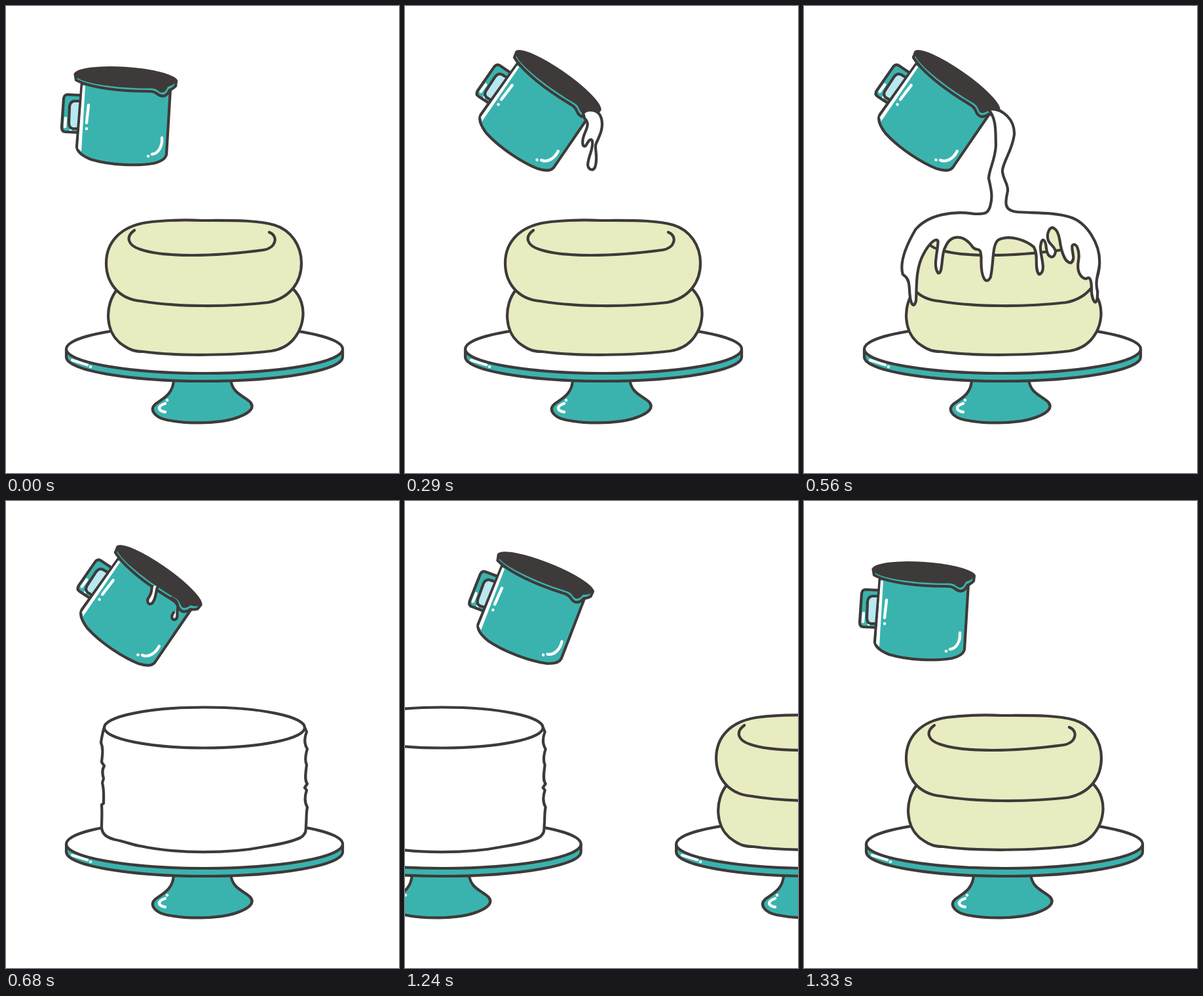
An HTML page for the animation above (1360 ms loop, 600x712 px).

```html
<!DOCTYPE html>
<html lang="en">
<head>
<meta charset="utf-8">
<title>Icing a cake</title>
<style>
  html, body { margin: 0; width: 100%; height: 100%; overflow: hidden; background: #fff; }
  svg { display: block; width: 100vw; height: 100vh; }
  svg * { stroke-linecap: round; stroke-linejoin: round; }
  .line { stroke: #3e3a39; stroke-width: 4.2; fill: none; }
  .teal { fill: #3ab3ae; }
  .cream { fill: #e9ebc1; }
  .white { fill: #fff; }
  .sky { fill: #b8e8f2; }
  .dark { fill: #3e3a39; }
  .shine { stroke: #fff; stroke-width: 4.4; fill: none; }
</style>
</head>
<body>
<svg viewBox="0 0 600 712">
  <defs>
    <g id="stand">
      <path class="line teal" d="M256 570C255 592 240 598 228 607C217 617 230 628 245 631C280 638 330 637 357 626C372 620 381 612 372 603C360 593 346 590 343 570"/>
      <path class="shine" d="M243 606C231 610 231 617 243 619M246 601h.1"/>
      <path class="line teal" d="M92 523V535A211 37 0 0 0 514 535V523Z"/>
      <path class="shine" d="M101 540L124 547M129 550h.1"/>
      <ellipse class="line white" cx="303" cy="523" rx="211" ry="37"/>
    </g>
  </defs>

  <g id="served">
    <use href="#stand"/>
    <path class="line white" d="M150 345C147 354 146 362 145 368C149 378 147 388 146 398L150 404C146 410 147 416 149 423L147 430C150 440 149 452 149 461L146 463C147 475 146 490 146 498C147 509 155 513 165 516C185 520 195 525 205 526C260 538 340 538 395 527C420 523 440 518 450 513C458 508 458 502 458 495C459 485 458 477 460 467C456 460 456 450 459 441L456 437L460 431C455 425 458 412 459 402C456 396 457 388 460 378C455 370 455 362 459 352L456 345"/>
    <ellipse class="line white" cx="303" cy="345.500" rx="153" ry="31"/>
  </g>

  <g id="fresh">
    <use href="#stand"/>
    <path class="line cream" d="M170 432C150 455 150 500 180 518C190 525 198 527 210 527C260 534 350 533 405 526C445 520 460 480 451 452C448 442 443 436 438 431"/>
    <path class="line cream" d="M207 450C170 447 153 420 153 392C153 360 175 336 215 330C245 326 275 326 300 327C345 327 382 326 410 334C436 342 451 366 451 392C451 420 435 445 400 452C340 459 260 459 207 450Z"/>
    <path class="line" d="M196 342C182 352 186 365 205 371C225 378 250 380 285 380C325 380 355 377 393 372C413 369 416 350 402 345"/>
  </g>

  <g id="cup">
    <path class="line teal" d="M114 136L94 135Q89 135 88 141L85 185Q85 192 91 192L112 193"/>
    <path class="shine" d="M91 171L90 184M99 188h.1"/>
    <path class="line sky" d="M113 145L104 145Q98 146 97 153L96 178Q96 186 102 187L111 187"/>
    <path class="line teal" d="M116 116L108 214C108 222 115 228 130 234C160 243 200 244 225 240C238 237 244 232 245 226L251 126"/>
    <path class="white" d="M117 121L121 122L115 222L110 217Z"/>
    <path class="shine" d="M126 151L123 178M123 187h.1M238 201C239 215 232 225 223 226M217 229h.1"/>
    <path class="line teal" d="M105.500 104A78 16 4 0 1 260 114L259 122Q254 127 250 128C245 138 239 140 231 134C226 130 222 130 215 130C175 130 130 125 107 113Z"/>
    <path class="dark" d="M105.500 104A78 16 4 0 1 260 114C258 119 252 122 247 123C243 133 238 134 232 129C227 125 222 125.500 215 125.500C175 125.500 115 119 106 107Z"/>
  </g>

  <g id="drips">
    <path class="line white" d="M232 129C228 138 230 148 223 156C217 160 214 152 218 147C223 140 222 135 223 130"/>
    <path class="line white" d="M262 166C260 172 264 178 258 181C252 181 252 175 256 170"/>
    <path class="line" d="M253 148C262 152 263 158 262 166"/>
  </g>
  <path id="milk" class="line white"/>
</svg>

<script>
const LOOP = 1360, STEP = 30, POUR = 200, ICED = 680, SLIDE = 1180;

// Progress of each step while the cakes change places and the cup swings back.
const slideSteps = [0.101, 0.24, 0.409, 0.61, 0.82, 0.9945];
const returnTilt = [1, 0.8, 0.57, 0.35, 0.15, 0];

const firstPour = "M272 163C280 155 297 158 300 172C304 190 294 202 291 212C290 220 295 232 290 246C287 252 280 250 279 242C280 228 288 218 286 206C284 200 280 206 276 213C270 217 270 205 274 195C278 186 282 178 274 171Z";
const streamLeft = "M281 157C295 172 292 195 293 212C292 235 282 250 282 263C286 280 288 290 285 302";
const streamRight = "C303 312 308 297 311 282C312 270 302 262 303 250C305 235 318 220 321 196C322 175 305 155 281 157Z";
const icing = "C282 318 275 317 262 317C230 312 192 317 172 335C158 346 148 358 153 366C158 368 162 368 163 376C164 388 170 390 173 384C174 375 172 362 184 352C192 345 203 340 206 343C206 350 198 360 206 365C214 366 210 352 217 347C225 338 245 338 258 347C265 351 270 345 271 355C270 368 278 374 285 368C290 358 287 345 297 342"
  + "C315 338 340 343 350 347C358 353 350 362 358 366C370 364 360 354 360 347C362 339 368 342 369 348C371 355 381 356 383 350C380 345 369 345 371 338C375 330 386 334 389 342C392 352 398 358 406 358C414 355 406 350 408 346C414 343 420 350 417 357C414 366 424 369 429 369C437 366 437 374 437 379C440 387 446 388 446 378C441 370 449 364 449 358C450 345 430 330 405 322C380 314 350 316 325 314";

const [served, fresh, cup, drips, milk] =
  ["served", "fresh", "cup", "drips", "milk"].map(id => document.getElementById(id));

const clamp = v => Math.min(1, Math.max(0, v));
const show = (el, on) => el.setAttribute("display", on ? "inline" : "none");
const shift = (el, x) => el.setAttribute("transform", `translate(${x})`);
const warp = (path, fn) =>
  path.replace(/([\d.]+) ([\d.]+)/g, (_, x, y) => fn(+x, +y).map(v => v.toFixed(1)).join(" "));

function tiltCup(tilt) {
  const x = 179.5 + 21.5 * tilt ** 0.7;
  const y = 167.5 - 5 * tilt;
  cup.setAttribute("transform", `translate(${x} ${y}) rotate(${31 * tilt}) translate(-179.5 -167.5)`);
}

function milkPath(t) {
  if (t < 380) {
    const length = 1 + (t - 290) / 60;
    return warp(firstPour, (x, y) => [x + (length - 1) * 7, 160 + (y - 160) * length]);
  }
  const spread = 0.35 + 0.65 * clamp((t - 380) / 90);
  const run = clamp((t - 470) / 180);
  const height = 1 - clamp((t - 560) / 90);
  const stream = (x, y) => [x, 316 - (316 - y) * height];
  const flow = (x, y) => [
    300 + (x - 300) * (spread + 0.03 * run),
    330 + (y - 330) * (spread + (y > 330 ? 2.4 * run : 0))
  ];
  return warp(streamLeft, stream) + warp(icing, flow) + warp(streamRight, stream);
}

function stepTime(t) {
  if (t < POUR) return 0;
  const start = t < SLIDE ? POUR : SLIDE;
  const stepped = start + Math.floor((t - start) / STEP) * STEP;
  return t < SLIDE ? Math.min(stepped, ICED) : stepped;
}

function draw(now) {
  const t = stepTime(now % LOOP);
  const sliding = t >= SLIDE;
  const index = Math.round((t - SLIDE) / STEP);
  const progress = sliding ? slideSteps[index] : 0;

  show(served, t >= ICED);
  show(fresh, t < ICED || sliding);
  shift(served, -600 * progress);
  shift(fresh, sliding ? 545 * (1 - progress) : 0);

  tiltCup(sliding ? returnTilt[index] : t < POUR ? 0 : clamp((t - POUR + STEP) / 90));
  show(drips, t >= 590 && !sliding);

  const pouring = t >= 290 && t < ICED;
  show(milk, pouring);
  if (pouring) milk.setAttribute("d", milkPath(t));
}

const started = performance.now();
function tick() {
  draw(performance.now() - started);
  requestAnimationFrame(tick);
}
tick();
</script>
</body>
</html>
```
